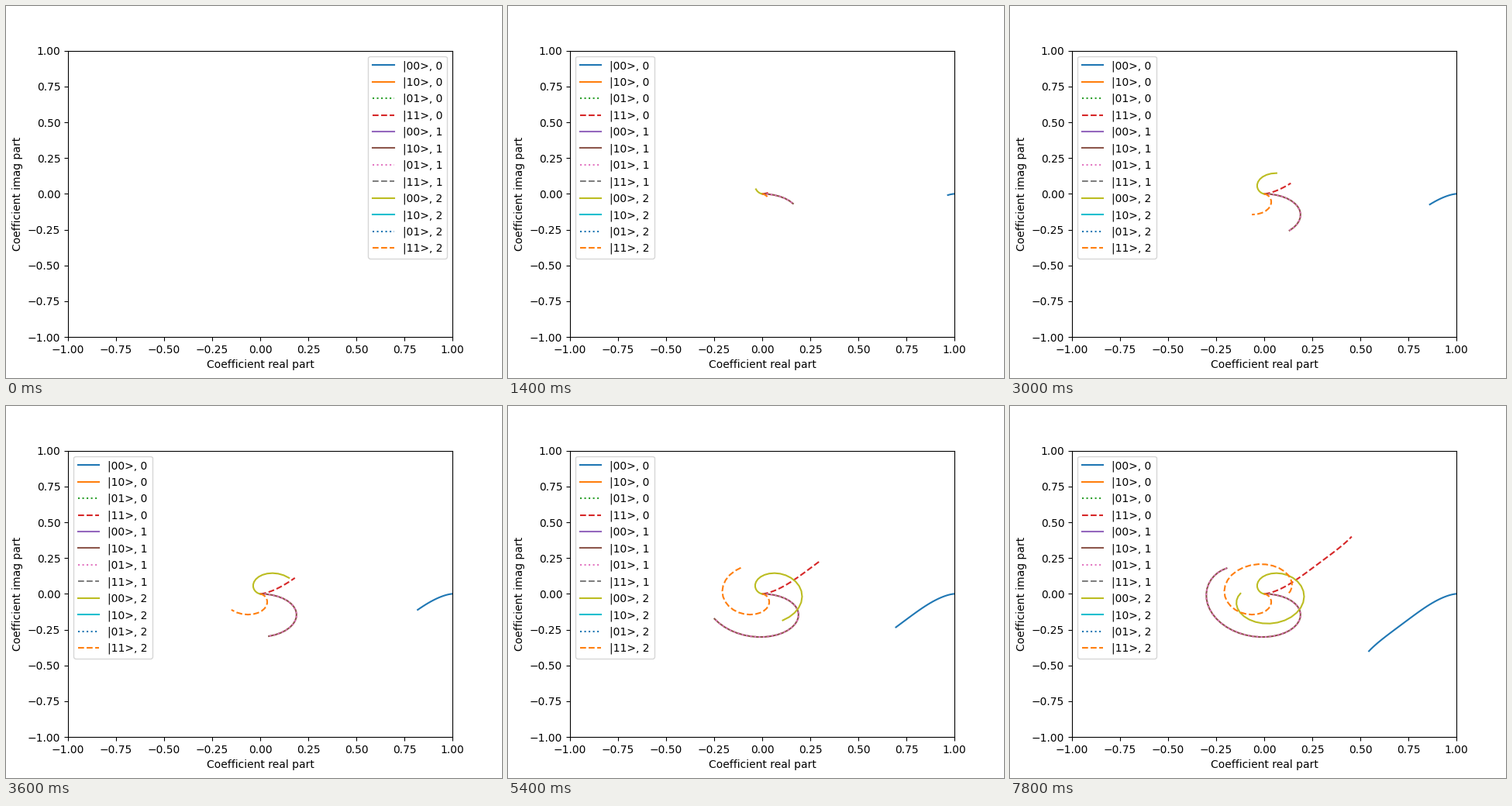
Animation of 640x480 px, one loop 8000 ms. Source, as a matplotlib script:

```python
import numpy as np
import matplotlib.pyplot as plt
from matplotlib.animation import FuncAnimation

FRAMES = 40
INTERVAL = 200
STEP = 0.1275      # phase advance per frame
MOVE_LEGEND = 7    # frame at which the legend jumps to the left


def coefficients(theta):
    """Two spins driven by one displaced oscillator, levels 0 to 2."""
    alpha = np.sin(theta / 2) * np.exp(-0.5j * theta)
    phase = (theta - np.sin(theta)) / 4
    g = np.exp(-np.abs(alpha) ** 2 / 2 - 1j * phase)
    zero = np.zeros_like(g)
    one = g * alpha / 2
    two = g * alpha ** 2 / np.sqrt(8)
    return [
        (1 + g) / 2, zero, zero, (1 - g) / 2,
        zero, one, one, zero,
        -two, zero, zero, two,
    ]


curves = coefficients(STEP * np.arange(FRAMES))

fig, ax = plt.subplots(figsize=(6.4, 4.8), dpi=100)
ax.set(xlim=(-1, 1), ylim=(-1, 1),
       xlabel="Coefficient real part", ylabel="Coefficient imag part")

styles = {"00": "-", "10": "-", "01": ":", "11": "--"}
lines = [
    ax.plot([], [], style, label=f"|{spins}>, {level}")[0]
    for level in range(3)
    for spins, style in styles.items()
]
legend = ax.legend(loc="upper right")


def update(k):
    for line, curve in zip(lines, curves):
        line.set_data(curve.real[:k], curve.imag[:k])
    legend.set_loc("upper right" if k < MOVE_LEGEND else "upper left")
    return [*lines, legend]


def init():
    return update(0)


anim = FuncAnimation(fig, update, frames=FRAMES, init_func=init,
                     interval=INTERVAL, repeat=True, repeat_delay=0)
plt.show()
```
